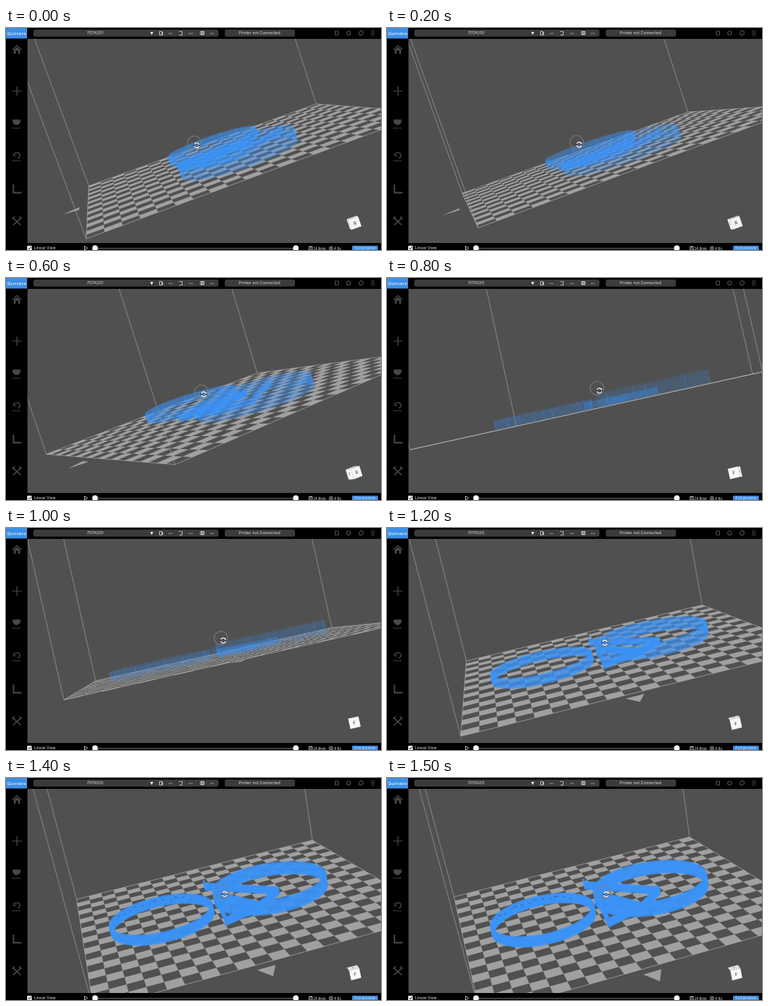
An HTML page with a canvas that plays this animation: 480x285 px, repeating every 1.6 s.

```html
<!DOCTYPE html>
<html lang="en">
<head>
<meta charset="utf-8">
<title>Print preview orbit</title>
<style>
  html, body { margin: 0; width: 100%; height: 100%; overflow: hidden; background: #000; }
  canvas, svg { position: absolute; left: 0; top: 0; width: 480px; height: 285px; }
  text { font-family: Inter, Roboto, sans-serif; fill: #e6e6e6; font-size: 4.6px; }
  .mid { text-anchor: middle; }
  .dim { fill: none; stroke: #484848; stroke-width: 1.2; }
  .ico { fill: none; stroke: #d8d8d8; stroke-width: .8; }
</style>
</head>
<body>
<canvas id="view" width="480" height="285"></canvas>
<svg viewBox="0 0 480 285">
  <path d="M0 0H480V14H27.500V276H480V285H0Z"/>
  <rect width="27" height="13.500" fill="#3c8ee6"/>
  <text class="mid" x="13.500" y="8.500" style="font-size:5.300px;fill:#fff">Quorvane</text>

  <g fill="#3b3b3b">
    <rect x="35" y="2" width="237" height="9" rx="2.500"/>
    <rect x="280" y="2" width="90" height="9" rx="2.500"/>
  </g>
  <text class="mid" x="114" y="8.300">70174200</text>
  <path d="M184.500 5h4l-2 4z" fill="#eee"/>
  <g class="ico">
    <path d="M196.500 4.500h3v4.500h-3zM200.500 5v4M221.500 4.500h3M225.500 4v5h-3.500M249 4.500h4.500v4H249zM250.500 4v5M252 4v5"/>
    <path d="M208 7h5M234 7h5M261 7h5" stroke-dasharray="1.2 .7"/>
  </g>
  <text class="mid" x="324.500" y="8.300" style="font-size:5.100px">Printer not Connected</text>
  <g class="dim">
    <path d="M421.500 4h4v5h-4zM452 6l2-2.500 3 1v3l-3 2-2-1zM467 4h5M467 6.500h5M467 9h5"/>
    <circle cx="438.500" cy="6.500" r="2.500"/>
  </g>

  <g class="dim">
    <path d="M8 28l6-5.500 6 5.500"/>
    <path d="M10 28l4-3.500 4 3.500v5h-2.500v-4h-3v4h-2.500z" fill="#484848" stroke="none"/>
    <path d="M8 81h12M14 75v12"/>
    <path d="M9 118h9v3l-3 3h-3l-3-3z" fill="#484848"/>
    <path d="M10 164a4 3.500 0 1 1 5 3M10 161v3h3"/>
    <path d="M8 128.500h11M8 170.500h11" stroke-dasharray="2 .7"/>
    <path d="M9.500 201v10.500h10.500" stroke-width="1.800"/>
    <path d="M9 244l10 9M19 244l-10 9M8 245l3-3M17 242l3 3" stroke-width="1.600"/>
  </g>

  <rect x="27" y="279.500" width="6" height="6" rx="1" fill="#eee"/>
  <path d="M28.300 282.500l1.500 1.500 2.300-3" fill="none" stroke="#111" stroke-width=".9"/>
  <text x="36" y="284.300" style="font-size:5px">Linear View</text>
  <path class="ico" d="M100.500 280l4 2.500-4 2.500z"/>
  <path d="M114 283H371" stroke="#777"/>
  <g fill="#fff">
    <circle cx="114" cy="282.700" r="3.600"/>
    <circle cx="371" cy="282.700" r="3.600"/>
  </g>
  <path class="ico" d="M388 280.500h4v4.500h-4zM390 281v2.500"/>
  <text x="393.500" y="284.500" style="font-size:4.200px">24.8min</text>
  <circle class="ico" cx="416" cy="282.800" r="2.200"/>
  <path class="ico" d="M415 282.800h2"/>
  <text x="420" y="284.500" style="font-size:4.200px">4.9g</text>
  <rect x="443" y="279.500" width="33" height="6" rx="1" fill="#3c8ee6"/>
  <text class="mid" x="459.500" y="284.200">Exit preview</text>
</svg>
<script>
const ctx = document.getElementById('view').getContext('2d');
const LOOP = 1600, STEP = 100, TILES = 20, LAYERS = 12;
const BLUE = '#3b93f7';

// The plate is a unit square around the world origin, z points up.
const EYE = { x: 253, y: 145 };       // principal point
const HOME = { x: 31, y: 19 };        // plate centre relative to it
const SCALE = 376, PERSPECTIVE = .42;

// Orbit poses in degrees
const ORBIT = [
  { t: 0,    yaw: -83,  pitch: 7,    roll: 19 },
  { t: 400,  yaw: -74.4, pitch: 2.7, roll: 18.5 },
  { t: 600,  yaw: -60,  pitch: 6.6,  roll: 17.2 },
  { t: 800,  yaw: -12,  pitch: -1.6, roll: 12.5 },
  { t: 1000, yaw: 4,    pitch: .5,   roll: 12.6 },
  { t: 1300, yaw: 7.5,  pitch: 17,   roll: 12 },
  { t: 1500, yaw: 10.3, pitch: 20.5, roll: 11 }
];

function orbitAt(t) {
  const i = Math.max(1, ORBIT.findIndex(p => p.t >= t));
  const a = ORBIT[i - 1], b = ORBIT[i], k = (t - a.t) / (b.t - a.t);
  const mix = n => a[n] + (b[n] - a[n]) * k;
  return { yaw: mix('yaw'), pitch: mix('pitch'), roll: mix('roll') };
}

// Turns a world vector into [screen x, screen y, depth].
function makeCamera({ yaw, pitch, roll }) {
  const wave = d => [Math.cos(d * Math.PI / 180), Math.sin(d * Math.PI / 180)];
  const [cy, sy] = wave(yaw), [cp, sp] = wave(pitch), [cr, sr] = wave(roll);
  return (x, y, z) => {
    const right = x * cy - y * sy;
    const ahead = x * sy + y * cy;
    const down = -ahead * sp - z * cp;
    return [right * cr + down * sr, down * cr - right * sr, ahead * cp - z * sp];
  };
}

let camera;
function project(x, y, z = 0) {
  const [sx, sy, depth] = camera(x, y, z);
  const w = 1 + PERSPECTIVE * depth;
  return [EYE.x + (HOME.x + SCALE * sx) / w, EYE.y + (HOME.y + SCALE * sy) / w];
}

function trace(points, closed) {
  points.forEach((p, i) => i ? ctx.lineTo(...p) : ctx.moveTo(...p));
  if (closed) ctx.closePath();
}
function stroke(points, color, width, closed) {
  ctx.beginPath();
  trace(points, closed);
  ctx.strokeStyle = color;
  ctx.lineWidth = width;
  ctx.stroke();
}

function drawPlate() {
  const corners = [[-.5, -.5], [.5, -.5], [.5, .5], [-.5, .5]];
  for (const [x, y] of corners) {
    stroke([project(x, y), project(x, y, 1)], 'rgba(190,190,190,.6)', .8);
  }
  const tile = 1 / TILES;
  ctx.fillStyle = '#a0a0a0';
  ctx.beginPath();
  for (let i = 0; i < TILES; i++) {
    for (let j = i % 2; j < TILES; j += 2) {
      trace(corners.map(([x, y]) => project((i + .5 + x) * tile - .5, (j + .5 + y) * tile - .5)), true);
    }
  }
  trace([project(-.055, -.53), project(-.003, -.53), project(-.029, -.59)], true);
  ctx.fill();
  stroke(corners.map(c => project(...c)), 'rgba(185,185,185,.75)', .8, true);
}

const circle = (x, y, r) => a => [x + r * Math.cos(a), y + r * Math.sin(a)];
const sample = f => Array.from({ length: 49 }, (_, i) => f(i * Math.PI / 24));
const smallRing = circle(-.23, -.006, .172);
const largeRing = circle(.157, .009, .192);
const tip = [-.03, .215], nose = [.177, -.02], belly = [.084, -.115], foot = [-.046, -.17], back = [-.02, .1];
const WALLS = [
  { path: sample(smallRing), h: .03 },
  { path: sample(largeRing), h: .042 },
  { path: [tip, nose, belly, foot, back], h: .022 },
  { path: [back, belly], h: .022 }
];

function drawModel(pitch) {
  const tilt = Math.max(0, pitch);
  const alpha = .2 + .025 * tilt, width = .8 + .15 * tilt;
  const post = (p, h) => stroke([project(...p), project(...p, h)], BLUE, Math.max(1, width * .6));
  ctx.lineJoin = 'round';
  ctx.globalAlpha = alpha;
  for (let k = 0; k < LAYERS; k++) {
    for (const { path, h } of WALLS) {
      const z = .004 + h * k / (LAYERS - 1);
      stroke(path.map(p => project(...p, z)), BLUE, width);
    }
  }
  ctx.globalAlpha = Math.min(1, alpha * 1.6);
  for (let i = 0; i < 11; i++) post(smallRing(i * 2.4), .036);
  for (let i = 0; i < 5; i++) post(largeRing(i * 2.7), .047);
  [tip, back, foot].forEach(p => post(p, .04));

  // gaps in the far wall of the small ring
  ctx.globalAlpha = Math.max(0, alpha - .3) * 1.6;
  for (let i = 0; i < 13; i++) {
    const a = .75 + i * .15, z = .016 + .01 * Math.abs(Math.sin(i * 5.3));
    stroke([project(...smallRing(a), z), project(...smallRing(a + .03 + .03 * (i % 3)), z)], '#25588f', 1.1);
  }
  ctx.globalAlpha = 1;
}

function drawCube() {
  const size = 13.5;
  const X = camera(1, 0, 0), Y = camera(0, 1, 0), Z = camera(0, 0, 1);
  const face = (normal, right, up, letter, color) => {
    if (normal[2] >= 0) return;
    ctx.save();
    ctx.translate(445.5, 250);
    ctx.scale(size, size);
    ctx.transform(right[0], right[1], -up[0], -up[1], normal[0] / 2, normal[1] / 2);
    ctx.fillStyle = color;
    ctx.fillRect(-.5, -.5, 1, 1);
    ctx.fillStyle = '#333';
    ctx.scale(.05, .05);
    ctx.font = '9px Inter, sans-serif';
    ctx.textAlign = 'center';
    ctx.textBaseline = 'middle';
    ctx.fillText(letter, 0, .5);
    ctx.restore();
  };
  face(Z, X, Y, 'T', '#e2e2e2');
  face(X, Y, Z, 'R', '#f4f4f4');
  face(Y.map(v => -v), X, Z, 'F', '#fafafa');
}

// The pointer drags the view, so it follows the orbit angles.
function drawPointer({ yaw, pitch }) {
  const x = 273.5 + .39 * yaw, y = 141.3 + .27 * pitch - .05 * yaw;
  const arc = (cx, cy, r, from, to, color, width) => {
    ctx.beginPath();
    ctx.arc(cx, cy, r, from, to);
    ctx.strokeStyle = color;
    ctx.lineWidth = width;
    ctx.stroke();
  };
  arc(x, y, 8.7, 0, 7, 'rgba(125,125,125,.8)', 1.2);
  arc(x + 3, y + 3.2, 3.2, 0, 7, 'rgba(30,30,30,.7)', 2.2);
  for (const from of [.3, 3.5]) arc(x + 3, y + 3.2, 3.2, from, from + 2.6, '#fff', 1.4);
}

function draw(t) {
  const pose = orbitAt(t);
  camera = makeCamera(pose);
  ctx.fillStyle = '#505050';
  ctx.fillRect(0, 0, 480, 285);
  drawPlate();
  drawModel(pose.pitch);
  drawPointer(pose);
  drawCube();
}

const start = performance.now();
let last = -1;
function tick() {
  const t = Math.floor((performance.now() - start) % LOOP / STEP) * STEP;
  if (t !== last) draw(last = t);
  requestAnimationFrame(tick);
}
tick();
</script>
</body>
</html>
```
